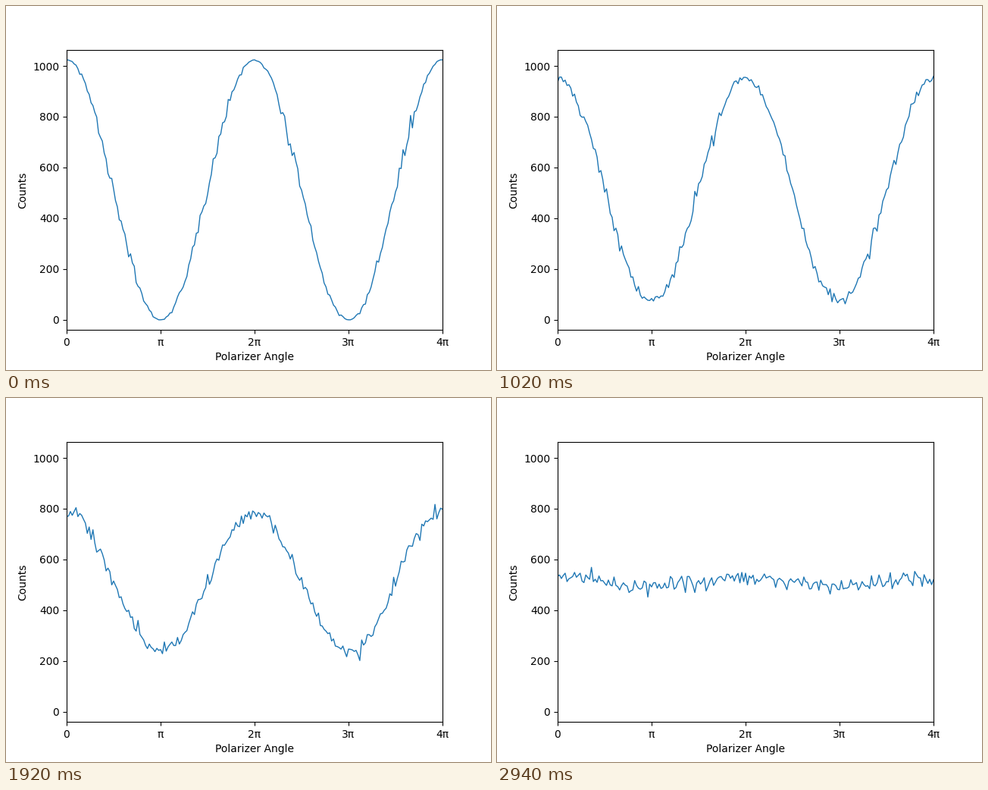
These frames come from a looping animation (640x480 px, 3 s). A matplotlib script:

```python
import numpy as np
import matplotlib.pyplot as plt
from matplotlib.animation import FuncAnimation

FRAMES = 50
INTERVAL = 60
SHOTS = 1024
MARGIN = 40
POINTS = 201

theta = np.linspace(0, 4 * np.pi, POINTS)


def counts(frame):
    """Binomial detector counts for a visibility that fades as a cosine."""
    visibility = np.cos(np.pi / 2 * frame / FRAMES)
    prob = np.clip((1 + visibility * np.cos(theta)) / 2, 0, 1)
    return np.random.default_rng(1000 + frame).binomial(SHOTS, prob)


plt.rcParams["font.family"] = "DejaVu Sans"
fig, ax = plt.subplots(figsize=(6.4, 4.8), dpi=100)
line, = ax.plot(theta, counts(0), color="#1f77b4", lw=1)

ax.set_xlim(0, 4 * np.pi)
ax.set_ylim(-MARGIN, SHOTS + MARGIN)
ax.set_xticks(np.arange(5) * np.pi, ["0", "π", "2π", "3π", "4π"])
ax.set_xlabel("Polarizer Angle")
ax.set_ylabel("Counts")


def update(frame):
    line.set_ydata(counts(frame))
    return line,


anim = FuncAnimation(fig, update, frames=FRAMES, interval=INTERVAL,
                     repeat=True, repeat_delay=0)
plt.show()
```
